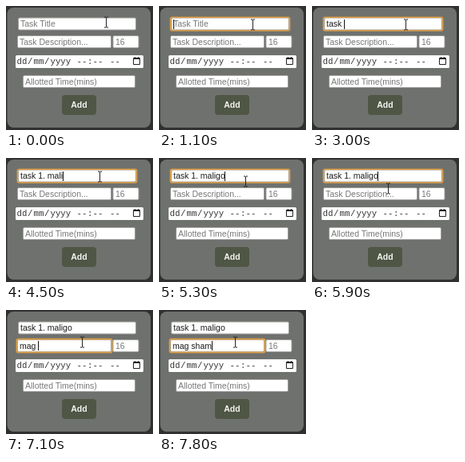
Write an HTML page that moves like this. It is 184 by 156 pixels and loops after 8000 ms.

```html
<!DOCTYPE html>
<html lang="en">
<head>
<meta charset="utf-8">
<title>Task form</title>
<style>
  html, body { margin: 0; width: 184px; height: 156px; overflow: hidden; background: #2f312f; }
  svg { display: block; }
  text { font: 10.5px "Liberation Sans", Arial, sans-serif; white-space: pre; fill: #777; }
  .typed { fill: #1a1a1a; }
  .date text { font: 10.7px "Liberation Mono", monospace; fill: #333; }
  .add { font-weight: bold; fill: #f4f4f0; }
  .field { fill: #fff; stroke: #a3a4a1; }
  .ring { fill: none; stroke: #e3a244; stroke-width: 1.6; }
</style>
</head>
<body>
<svg width="184" height="156" viewBox="0 0 184 156">
  <rect x="1.5" y="2" width="179.5" height="151" rx="8" fill="#6f716e"/>
  <g class="field">
    <rect x="15.5" y="15" width="147" height="15" rx="1.5"/>
    <rect x="14.5" y="37.5" width="117" height="15" rx="1.5"/>
    <rect x="134" y="37.5" width="32" height="15" rx="1.5"/>
    <rect x="12" y="62" width="160" height="16" rx="1.5" stroke="none"/>
    <rect x="21.5" y="87.5" width="140" height="15" rx="1.5"/>
  </g>
  <text x="137" y="49">16</text>
  <text x="24" y="99">Allotted Time(mins)</text>
  <g class="date">
    <text x="13.5" y="73">dd</text><text x="27" y="73">/</text>
    <text x="34.5" y="73">mm</text><text x="48" y="73">/</text>
    <text x="55.5" y="73">yyyy</text><text x="88.5" y="73">--</text>
    <text x="102" y="73">:</text><text x="108.5" y="73">--</text>
    <text x="130" y="73">--</text>
  </g>
  <path d="M159.5 65.5h8v8h-8zM159.5 66.5h8M161.5 64v2M165.5 64v2" fill="none" stroke="#222"/>
  <rect x="70" y="112" width="43" height="25" rx="4" fill="#4f5645"/>
  <text class="add" x="91.5" y="128" text-anchor="middle">Add</text>

  <text id="title" x="18" y="26"></text>
  <text id="detail" x="17" y="49"></text>
  <rect id="ring" class="ring" rx="2"/>
  <rect id="caret" width="1" height="12" fill="#111"/>
  <path id="pointer" d="M-2.5 -6.5h2l.5 .5l.5 -.5h2M0 -6V6M-2.5 6.5h2l.5 -.5l.5 .5h2" fill="none" stroke="#222"/>
</svg>
<script>
const LOOP = 8000, BLINK = 530;
const el = id => document.getElementById(id);
const ring = el('ring'), caret = el('caret'), pointer = el('pointer');

const fields = [
  { node: el('title'), hint: 'Task Title', value: 'task 1. maligo', x: 18, y: 17,
    focus: 600, blur: 5950, ring: [14.4, 14.2, 149.2, 16.8],
    keys: [1700, 1900, 2200, 2700, 3000, 3700, 3900, 4100, 4200, 4300, 4400, 4500, 4700, 4800] },
  { node: el('detail'), hint: 'Task Description...', value: 'mag sham', x: 17, y: 39,
    focus: 5950, blur: LOOP, ring: [13.4, 36.6, 119.2, 16.8],
    keys: [6700, 6800, 7000, 7100, 7300, 7500, 7600, 7800] }
];

// Pointer stops: time, x, y
const path = [[0, 126, 20], [100, 126, 20], [550, 118, 23], [5000, 118, 23],
              [5700, 96, 37], [6000, 96, 38], [6300, 96, 39.5], [LOOP, 96, 39.5]];

function pointerAt(t) {
  const i = path.findIndex(p => p[0] > t);
  const [t0, x0, y0] = path[i - 1], [t1, x1, y1] = path[i];
  const u = (t - t0) / (t1 - t0), e = u * u * (3 - 2 * u);
  return [x0 + (x1 - x0) * e, y0 + (y1 - y0) * e];
}

function place(node, x, y, width, height) {
  const box = { x, y, width, height };
  for (const k in box) if (box[k] !== undefined) node.setAttribute(k, box[k]);
}

function drawField(f, t) {
  const count = f.keys.filter(k => k <= t).length;
  f.node.textContent = count ? f.value.slice(0, count) : f.hint;
  f.node.classList.toggle('typed', count > 0);
  if (t < f.focus || t >= f.blur) return;

  place(ring, ...f.ring);
  ring.style.display = '';
  const lastInput = count ? f.keys[count - 1] : f.focus;
  const lit = Math.floor((t - lastInput) / BLINK) % 2 === 0;
  const width = count ? f.node.getComputedTextLength() : 0;
  place(caret, Math.round(f.x + width - 0.5), f.y);
  caret.style.display = lit ? '' : 'none';
}

function draw(t) {
  ring.style.display = caret.style.display = 'none';
  fields.forEach(f => drawField(f, t));
  const [x, y] = pointerAt(t);
  pointer.setAttribute('transform', `translate(${Math.round(x) - 0.5} ${Math.round(y) + 0.5})`);
}

const start = performance.now();
function tick() {
  draw((performance.now() - start) % LOOP);
  requestAnimationFrame(tick);
}
tick();
</script>
</body>
</html>
```
